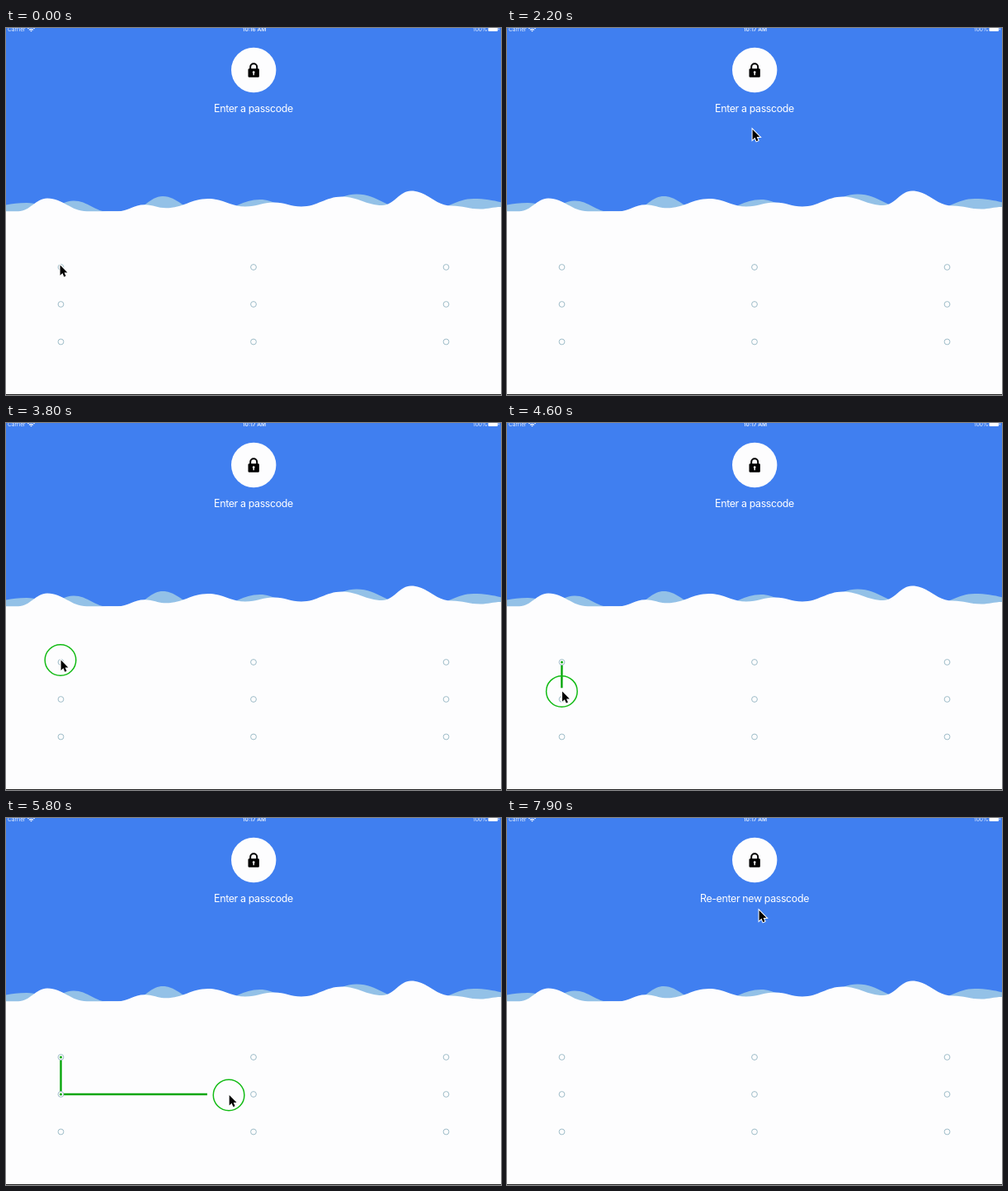
Recreate the animation shown at these times as an HTML page. Size 600 px wide and 445 px high, loop 8000 ms.

```html
<!DOCTYPE html>
<html lang="en">
<head>
<meta charset="utf-8">
<title>Pattern passcode</title>
<style>
  html, body { margin: 0; width: 100%; height: 100%; overflow: hidden; background: #fdfdfe; }
  svg { display: block; width: 600px; height: 445px; }
  text { font-family: Inter, Roboto, sans-serif; fill: #fff; }
  .status { font-size: 6.6px; fill: #e6effd; }
  .prompt { font-size: 12.4px; letter-spacing: -.36px; text-anchor: middle; }
  .dot { fill: #fdfdfe; stroke: #93b5c2; stroke-width: .9; }
  .core { fill: #0aa80e; }
  .trace { fill: none; stroke: #08a60c; stroke-width: 2.4; }
  .ring { fill: none; stroke: #12bb14; stroke-width: 1.5; }
</style>
</head>
<body>
<svg viewBox="0 0 600 445">
  <rect width="600" height="445" fill="#fdfdfe"/>
  <rect width="600" height="222.3" fill="#407ff0"/>
  <path id="back" fill="#93c1e7"/>
  <path id="front" fill="#fdfdfe"/>

  <g transform="translate(0 -.6)">
    <text class="status" x="2" y="4.5">Carrier</text>
    <path d="M26.3 1.4Q30.5 -2 34.7 1.4M28 3Q30.5 1 33 3" fill="none" stroke="#fff" stroke-width="1.1"/>
    <path fill="#fff" d="M29.2 3.7Q30.5 2.8 31.8 3.7L30.5 5.2Z"/>
    <text id="clock" class="status" x="301" y="4.5" text-anchor="middle" font-weight="600"></text>
    <text class="status" x="566" y="4.5">100%</text>
    <rect x="584.5" y="-1" width="11.5" height="5.5" rx="1" fill="#fff"/>
    <rect x="596.7" y="1" width="1" height="2" fill="#fff"/>
  </g>

  <circle cx="300.2" cy="51" r="27.2" fill="#fdfdfe"/>
  <path d="M296.2 51V47.2a4 4 0 0 1 8 0V51" fill="none" stroke="#000" stroke-width="2"/>
  <rect x="293.5" y="49.2" width="13.4" height="10.6" rx="1.4"/>
  <path fill="#fff" d="M300.2 52.2a1.4 1.4 0 0 1 .7 2.6V57.3h-1.4V54.8a1.4 1.4 0 0 1 .7 -2.6Z"/>
  <text id="prompt" class="prompt" x="300" y="101.5"></text>

  <path id="trace" class="trace"/>
  <g id="dots"></g>
  <circle id="ring" class="ring" r="18.8"/>
  <g id="cursor">
    <path transform="translate(.6 1) scale(.92)" stroke="#fff" stroke-width="2.2" paint-order="stroke"
      d="M0 0V13.5L3.1 10.7L5.2 15.4L7.5 14.4L5.5 9.8H9.6Z"/>
  </g>
  <rect y="444" width="600" height="1" fill="#222"/>
</svg>
<script>
const LOOP = 8000, STEP = 100, PRESS = 3800, RELEASE = 6800;
const COLS = [66.5, 300, 533.5], ROWS = [290, 335, 380.5];
const HOME = [65, 286.5];
const $ = id => document.getElementById(id);

// crests and troughs of the two waves
const back = [[-30, 218], [25, 212], [55, 216], [82, 209.5], [125, 223], [150, 222], [190, 204],
  [235, 222], [255, 221], [308, 208], [350, 219], [365, 221], [425, 201.5], [490, 221],
  [512, 221], [567, 207], [640, 217]];
const front = [[0, 222.3], [15, 222.3], [50, 206.5], [98, 222.3], [135, 222.3], [168, 214.3],
  [194, 218.3], [245, 207], [290, 216.5], [325, 211.5], [358, 216.5], [407, 204.5], [456, 215],
  [491, 197.5], [540, 215.5], [575, 219.5], [600, 217]];

// pointer moves, each eased out
const moves = [
  { from: 800, to: 2200, x: 297, y: 122 },
  { from: 2300, to: 3250, x: 66, y: 286.5 },
  { from: 3800, to: 5300, x: 66.5, y: 335 },
  { from: 5300, to: 6110, x: 305, y: 335 },
  { from: 6900, to: 7800, x: 305, y: 111 }
];

// joined dots and the time each is reached
const hits = [
  { at: 3900, x: COLS[0], y: ROWS[0] },
  { at: 5000, x: COLS[0], y: ROWS[1] },
  { at: 6000, x: COLS[1], y: ROWS[1] }
];

// smooth hills, flat at every crest and trough
function wave(points) {
  let d = "M" + points[0];
  for (let i = 1; i < points.length; i++) {
    const [x0, y0] = points[i - 1], [x, y] = points[i];
    const bend = (x - x0) * 0.4;
    d += `C${x0 + bend} ${y0} ${x - bend} ${y} ${x} ${y}`;
  }
  return d + `V224H${points[0][0]}Z`;
}

function pointer(t) {
  let [x, y] = HOME;
  for (const m of moves) {
    const u = Math.min(1, Math.max(0, (t - m.from) / (m.to - m.from)));
    const k = 1 - (1 - u) ** 2;
    x += (m.x - x) * k;
    y += (m.y - y) * k;
  }
  return [x, y];
}

function circle(x, y, r, name) {
  const c = document.createElementNS("http://www.w3.org/2000/svg", "circle");
  const attrs = { cx: x, cy: y, r, class: name };
  for (const k in attrs) c.setAttribute(k, attrs[k]);
  $("dots").append(c);
  return c;
}

const show = (el, on) => el.setAttribute("visibility", on ? "visible" : "hidden");

$("back").setAttribute("d", wave(back));
$("front").setAttribute("d", wave(front));
for (const y of ROWS) for (const x of COLS) circle(x, y, 3.4, "dot");
const cores = hits.map(h => circle(h.x, h.y, 1.5, "core"));

function draw(t) {
  const [x, y] = pointer(t);
  const down = t >= PRESS && t < RELEASE;
  const done = hits.filter(h => down && t >= h.at);

  $("cursor").setAttribute("transform", `translate(${x} ${y})`);
  $("ring").setAttribute("transform", `translate(${x} ${y + 1})`);
  show($("ring"), down);
  cores.forEach((c, i) => show(c, i < done.length));

  // the line trails the pointer by one step
  const points = done.map(h => [h.x, h.y]);
  if (points.length) points.push(pointer(t - STEP));
  $("trace").setAttribute("d", points.length ? "M" + points.join("L") : "");

  $("clock").textContent = t < 100 ? "10:16 AM" : "10:17 AM";
  $("prompt").textContent = t < RELEASE ? "Enter a passcode" : "Re-enter new passcode";
}

const start = performance.now();
function tick() {
  const t = (performance.now() - start) % LOOP;
  draw(Math.floor(t / STEP) * STEP);
  requestAnimationFrame(tick);
}
tick();
</script>
</body>
</html>
```
